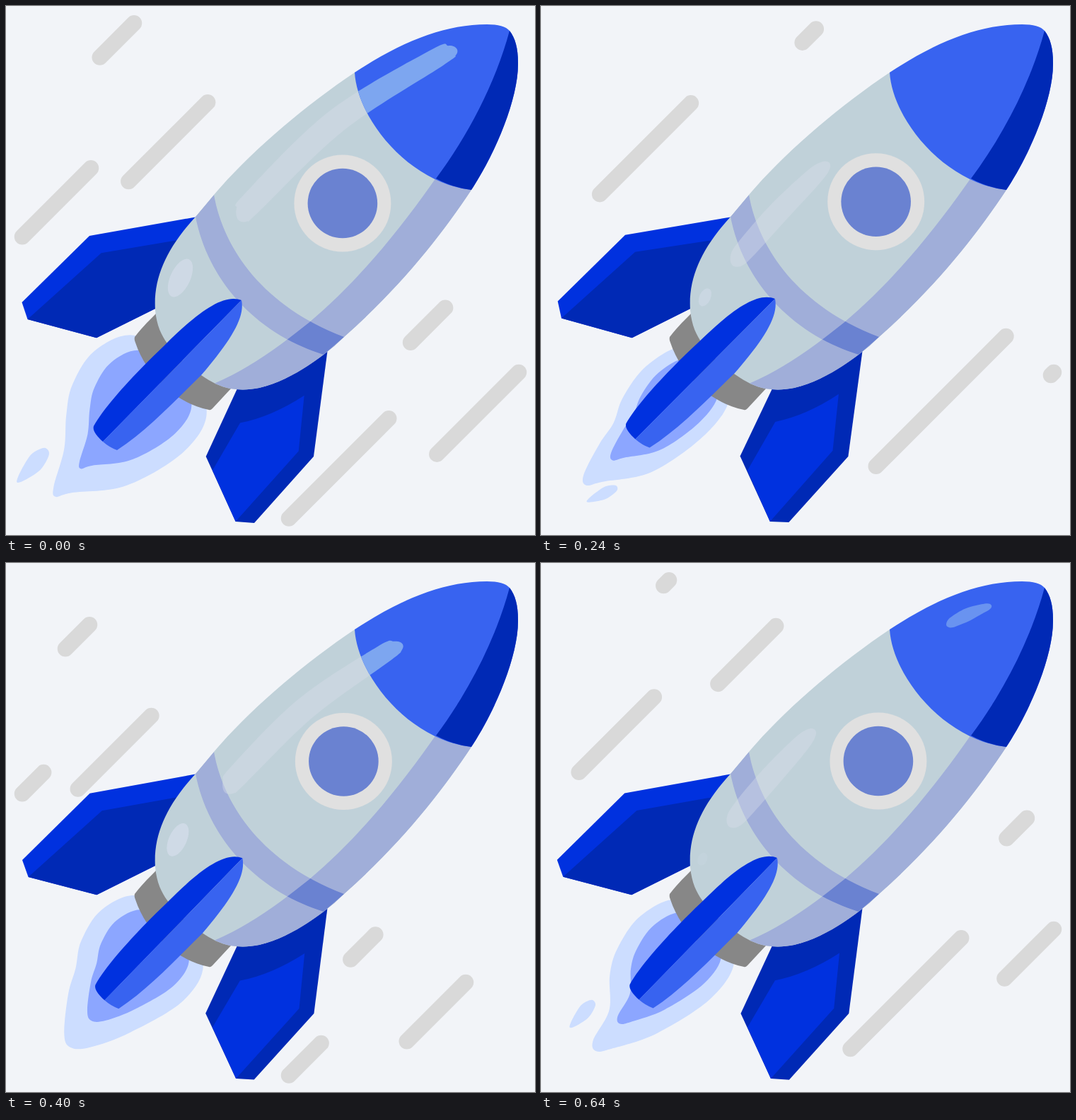
An HTML page for the animation above (0.68 s loop, 748 px wide and 748 px high).

```html
<!DOCTYPE html>
<html lang="en">
<head>
<meta charset="utf-8">
<title>Rocket</title>
<style>
  html, body { margin: 0; width: 100%; height: 100%; overflow: hidden; background: #f2f4f8; }
  svg { display: block; width: 100vw; height: 100vh; }
</style>
</head>
<body>
<svg viewBox="0 0 748 748">
  <defs>
    <path id="hull" d="M493 94C420 143 345 207 294 267L268 298C228 342 208 383 211 430C213 452 220 466 228 477C240 494 257 510 276 522C290 532 303 538 317 541C330 543 343 543 358 540C392 532 424 512 449 493Q464 482 478 468C560 395 615 325 658 260L690 60Z"/>
    <path id="shade" d="M608 243C556 318 495 392 428 448C395 474 350 510 294 534L317 570H500L700 260Z"/>
    <path id="belt" d="M294 267C308 345 365 425 478 468L449 493C350 462 285 385 268 298Z"/>
    <path id="nose" d="M493 94C560 50 620 26 680 26C696 26 707 29 712 35C720 45 724 60 724 80C725 130 692 209 658 260C570 250 497 160 493 94Z"/>
    <clipPath id="inHull"><use href="#hull"/></clipPath>
    <clipPath id="inShade"><use href="#shade"/></clipPath>
    <clipPath id="inNose"><use href="#nose"/></clipPath>
  </defs>
  <rect width="748" height="748" fill="#f2f4f8"/>
  <g id="streaks" stroke="#d9d9d9" stroke-width="22.5" stroke-linecap="round"></g>
  <g id="drops" fill="#ccddff"></g>
  <path id="flameOut" fill="#ccddff"/>
  <path id="flameIn" fill="#8ca6ff"/>
  <path id="finL" fill="#0031df"/>
  <path id="finLDark" fill="#0029b5"/>
  <path id="finR" fill="#0029b5"/>
  <path id="finRLight" fill="#0031df"/>
  <path fill="#878787" d="M212 435C200 447 190 457 182 468Q181 472 183 476C197 518 235 560 287 571Q289 572 292 569L318 541L270 490Z"/>
  <use href="#hull" fill="#c0d1d9"/>
  <g clip-path="url(#inHull)">
    <use href="#shade" fill="#a0aed9"/>
    <use href="#belt" fill="#a0aed9"/>
    <g clip-path="url(#inShade)"><use href="#belt" fill="#6a82d1"/></g>
    <path id="shine" fill="#d8dce8" opacity=".4"/>
    <ellipse id="spot" fill="#dde2f2"/>
  </g>
  <use href="#nose" fill="#3863f0"/>
  <path fill="#0029b5" d="M712 35C692 110 652 185 608 244Q632 257 658 260C692 209 725 130 724 80C724 60 720 45 712 35Z"/>
  <g clip-path="url(#inNose)" fill="#7da6f0">
    <path id="noseShine"/>
    <path id="glint"/>
  </g>
  <g id="port">
    <circle r="68.5" fill="#e0e0e0"/>
    <circle r="49.3" fill="#6a82d1"/>
  </g>
  <path id="keel" fill="#0031df"/>
  <path id="keelLight" fill="#3863f0"/>
</svg>
<script>
const LOOP = 680, CYCLE = 340, STEP = 40, { PI, sin, cos, hypot, min, max } = Math;
const $ = id => document.getElementById(id);
const set = (el, attrs) => { for (const k in attrs) el.setAttribute(k, attrs[k]); };
const clamp = u => min(1, max(0, u));
const mix = (a, b, f) => a.map((v, i) => v + (b[i] - v) * f);
const poly = (...pts) => 'M' + pts.join('L') + 'Z';

// Smooth closed curve through the points.
function smooth(pts) {
  const n = pts.length, p = i => pts[(i + n) % n];
  let d = 'M' + pts[0];
  for (let i = 0; i < n; i++) {
    const [a, b, c, e] = [p(i - 1), p(i), p(i + 1), p(i + 2)];
    d += 'C' + [0, 1].map(k => b[k] + (c[k] - a[k]) / 6) +
      ' ' + [0, 1].map(k => c[k] - (e[k] - b[k]) / 6) + ' ' + c;
  }
  return d + 'Z';
}

// Maps (along, across) to the stage, on the axis from (px,py) to (qx,qy).
function axis(px, py, qx, qy) {
  const len = hypot(qx - px, qy - py), ux = (qx - px) / len, uy = (qy - py) / len;
  return { len, pt: (s, w) => [px + ux * s + uy * w, py + uy * s - ux * w] };
}

// Adds two copies of an actor's shape, for passes that overlap across cycles.
function twice(actor, parent, tag) {
  actor.els = [0, 1].map(() =>
    $(parent).appendChild(document.createElementNS('http://www.w3.org/2000/svg', tag)));
  return actor;
}
function eachPass(actor, p, start, end, draw) {
  actor.els.forEach((el, i) => {
    const t = p + i * CYCLE, on = t > start && t < end;
    set(el, { visibility: on ? 'visible' : 'hidden' });
    if (on) draw(el, t);
  });
}

// A streak runs down the line x + y = sum; head and tail have their own time spans.
const streak = (sum, from, to, head, tail, power = 1) =>
  twice({ sum, from, to, head, tail, power }, 'streaks', 'line');
const streaks = [
  streak(205.3, 181, 55, [290, 470], [340, 460]),
  streak(1124.5, 731, 400, [75, 340], [75, 425], 2),
  streak(349.3, 293, 23, [75, 340], [75, 425], 1.6),
  streak(421.3, 400, 22, [220, 500], [220, 520], 1.3),
  streak(1047.8, 687, 440, [283, 455], [300, 450]),
  streak(1243, 725, 525, [235, 490], [340, 500])
];

function drawStreak(s, p) {
  const part = (t, [a, b]) => clamp((t - a) / (b - a));
  eachPass(s, p, s.head[0], s.tail[1], (el, t) => {
    const u = part(t, s.head), tail = part(t, s.tail) ** s.power;
    const head = max(tail, u + 0.18 * sin(PI * u) ** 2);
    const [x1, x2] = [head, tail].map(f => s.from + (s.to - s.from) * f);
    set(el, { x1, y1: s.sum - x1, x2, y2: s.sum - x2, opacity: min(1, (1 - tail) * 12) });
  });
}

// Drops swell and shrink while they drift; x, y hold at mid life.
const drops = [
  { birth: 185, life: 105, x: 88, y: 690, vx: -0.7, vy: 0.2, tilt: -25, len: 48, w: 8 },
  { birth: 275, life: 115, x: 41, y: 648, vx: -0.52, vy: 0.3, tilt: -47, len: 64, w: 12 }
].map(d => twice(d, 'drops', 'path'));

function drawDrop(d, p) {
  eachPass(d, p, d.birth, d.birth + d.life, (el, t) => {
    const age = (t - d.birth) / d.life, size = sin(PI * age) ** 0.5, dt = (age - 0.5) * d.life;
    const x = d.x + d.vx * dt, y = d.y + d.vy * dt, a = d.tilt * PI / 180;
    const dx = cos(a) * d.len * size / 2, dy = sin(a) * d.len * size / 2, w = d.w * size;
    const { len, pt } = axis(x - dx, y - dy, x + dx, y + dy);
    set(el, { d: smooth([pt(0, 0), pt(len * .6, w), pt(len * .93, w * .6), pt(len, 0), pt(len * .9, -w * .65), pt(len * .5, -w)]) });
  });
}

// Flame poses: time, then width, length, tip roundness, tip bend and neck.
const poses = [
  [0, 97, 243, 12, -10, 29], [60, 88, 222, 20, -18, 37], [140, 92, 222, 38, 0, 50],
  [240, 65, 236, 13, 6, 34], [300, 78, 235, 14, -13, 15], [CYCLE, 97, 243, 12, -10, 29]
];

function drawFlame(p) {
  const i = poses.findIndex(k => k[0] > p), a = poses[i - 1], b = poses[i];
  const [, w, len, round, bend, neck] = mix(a, b, (p - a[0]) / (b[0] - a[0]));
  const { pt } = axis(235, 515, 135, 615);
  const shape = [
    [-10, 0], [3, .75 * w], [.24 * len, w], [.47 * len, .88 * w], [.62 * len, .63 * w], [.77 * len, neck],
    [len - 8, bend + round], [len, bend], [len - 20, bend - round],
    [.66 * len, -.72 * w], [.28 * len, -.96 * w], [5, -.76 * w]
  ];
  // The across axis points down-right here, so flip it.
  set($('flameOut'), { d: smooth(shape.map(([s, x]) => pt(s, -x))) });
  set($('flameIn'), { d: smooth(shape.map(([s, x]) => pt(10 + .74 * s, -.71 * x))) });
}

function shinePath([px, py, qx, qy, bow, half]) {
  const { len, pt } = axis(px, py, qx, qy), end = min(30, len * 0.3);
  const rows = [[end * .28, .7], [end, .95], [len * .5, 1], [len - end, .82], [len - end * .22, .5]];
  const side = sign => rows.map(([s, w]) => {
    const f = s / len;
    return pt(s, bow * 4 * f * (1 - f) + sign * w * half);
  });
  return smooth([pt(0, 0), ...side(1), pt(len, 0), ...side(-1).reverse()]);
}

function drawShine(p) {
  const u = min(1, p / 320), e = 1 - (1 - u) ** 1.75;
  const d = shinePath(mix([328, 302, 637, 60, 24, 17], [265, 373, 385, 237, 2, 15], e));
  set($('shine'), { d });
  set($('noseShine'), { d });

  const g = clamp((p - 260) / 60) ** 0.5;
  set($('glint'), { d: g ? shinePath([637 - 78 * g, 60 + 35 * g, 637, 60, 2, 11 * g]) : '', opacity: .88 * g });

  const [cx, cy, rx, ry] = mix([246.5, 384.5, 14, 29], [227, 421, 6, 8], u);
  set($('spot'), { cx, cy, rx, ry, opacity: .5 * (1 - u ** 4), transform: `rotate(25 ${cx} ${cy})` });
}

function drawFins(s) {
  const q = s * s;
  const elbow = [118 + 1.6 * q, 325 + 1.6 * s], tip = [22.5 + 1.8 * q, 419 + 2 * s];
  const heel = [30.5 + 2 * s, 443 + 2 * s], base = [128 + q, 469.3];
  const fold = [134.7 + 2 * s, 349.3 + 1.8 * s], hidden = [[213, 427], [260, 380]];
  set($('finL'), { d: poly([268, 298.5], elbow, tip, heel, base, ...hidden) });
  set($('finLDark'), { d: poly([246, 330.5], fold, heel, base, ...hidden) });

  const toe = [351 - q, 731 - 1.5 * q], foot = [324.6 + s, 729], knee = [282.7 - 1.8 * q, 637 - .7 * q];
  set($('finR'), { d: poly([454.5, 488], [435 + s * .8, 637], toe, foot, knee, [327, 541], [390, 480]) });
  set($('finRLight'), {
    d: `M${331 - s * .3},${589.5 + 2 * s}Q375,${581 + 2.3 * s} ${421.7 + s},${550.7 + 2.4 * s}` +
      `L${413.7 + 1.5 * s},${629.5 + s}L${foot}L292,656.5Z`
  });
}

// The middle fin slides along the hull, its lower end further than its top.
function drawKeel(s) {
  const slide = d => d.replace(/(\d+) (\d+)/g, (_, x, y) => {
    const k = s * (2.6 + 2 * (333 - x) / 209);
    return `${+x + k} ${+y + k}`;
  });
  set($('keel'), { d: slide('M333 416C308 406 272 432 224 480C190 512 142 562 124 594C122 600 128 608 137 616Z') });
  set($('keelLight'), { d: slide('M333 416C338 440 319 472 276 522C240 557 200 600 157 628Q146 624 137 616Z') });
}

function render(t) {
  const p = t % CYCLE, sway = -sin(2 * PI * t / LOOP);
  streaks.forEach(s => drawStreak(s, p));
  drops.forEach(d => drawDrop(d, p));
  drawFlame(p);
  drawShine(p);
  drawFins(sway);
  drawKeel(sway);
  set($('port'), { transform: `translate(${475.9 + 2.8 * sway} ${279 + 2.8 * sway})` });
}

const start = performance.now();
function tick() {
  const t = max(0, performance.now() - start) % LOOP;
  render(Math.floor(t / STEP) * STEP);
  requestAnimationFrame(tick);
}
tick();
</script>
</body>
</html>
```
